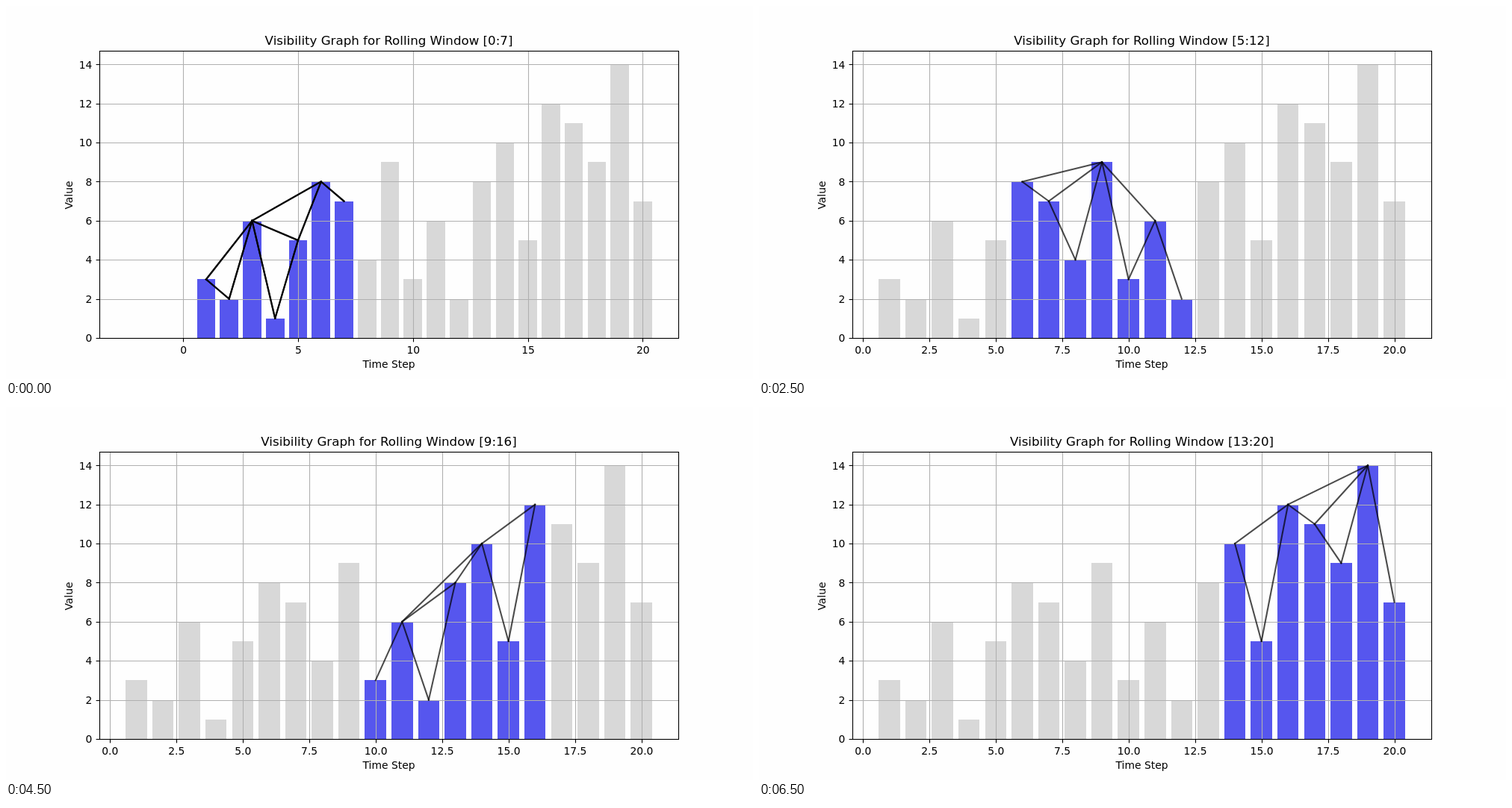
These frames come from a looping animation (1000 px wide and 500 px high, 7000 ms). An HTML page with a canvas:

```html
<!DOCTYPE html>
<html lang="en">
<head>
<meta charset="utf-8">
<title>Visibility Graph</title>
<style>
  html, body { margin: 0; overflow: hidden; background: #fefefe; }
  canvas { display: block; }
</style>
</head>
<body>
<canvas id="chart" width="1000" height="500"></canvas>
<script>
const ctx = document.getElementById('chart').getContext('2d');
const values = [3, 2, 6, 1, 5, 8, 7, 4, 9, 3, 6, 2, 8, 10, 5, 12, 11, 9, 14, 7];
const WINDOW = 7, STEP_MS = 500;
const STEPS = values.length - WINDOW + 1;
const LEFT = 125, RIGHT = 900, TOP = 60, BOTTOM = 445;
const MIDDLE = (LEFT + RIGHT) / 2;

const toY = v => BOTTOM - v * (BOTTOM - TOP) / 14.7;
const crisp = p => Math.round(p) + 0.5;

function line(x1, y1, x2, y2) {
  ctx.beginPath();
  ctx.moveTo(x1, y1);
  ctx.lineTo(x2, y2);
  ctx.stroke();
}

function text(label, x, y, align = 'center', size = 13.889) {
  ctx.font = `${size}px "DejaVu Sans", sans-serif`;
  ctx.textAlign = align;
  ctx.fillText(label, x, y);
}

// Two bars see each other when every bar between stays below the sight line.
function visible(a, b) {
  for (let i = a + 1; i < b; i++) {
    const sight = values[a] + (values[b] - values[a]) * (i - a) / (b - a);
    if (values[i] >= sight) return false;
  }
  return true;
}

function draw(start) {
  const first = start === 0;
  const [min, max] = first ? [-3.645, 21.545] : [-0.39, 21.39];
  const toX = v => LEFT + (v - min) * (RIGHT - LEFT) / (max - min);
  const end = start + WINDOW;

  ctx.fillStyle = '#fefefe';
  ctx.fillRect(0, 0, 1000, 500);

  values.forEach((v, i) => {
    const x = Math.round(toX(i + 0.6)), y = Math.round(toY(v));
    ctx.fillStyle = i >= start && i < end ? '#5656ee' : '#d8d8d8';
    ctx.fillRect(x, y, Math.round(toX(i + 1.4)) - x, BOTTOM - y);
  });

  const xTicks = [], yTicks = [];
  for (let v = 0; v <= 20; v += first ? 5 : 2.5) xTicks.push(v);
  for (let v = 0; v <= 14; v += 2) yTicks.push(v);

  ctx.lineWidth = 1.11;
  ctx.lineCap = 'butt';
  ctx.strokeStyle = '#b0b0b0';
  for (const v of xTicks) line(crisp(toX(v)), TOP, crisp(toX(v)), BOTTOM);
  for (const v of yTicks) line(LEFT, crisp(toY(v)), RIGHT, crisp(toY(v)));

  // The opening window is stroked repeatedly, which makes its edges solid.
  ctx.strokeStyle = 'rgba(0, 0, 0, 0.7)';
  ctx.lineWidth = 2.083;
  ctx.lineCap = 'square';
  for (let pass = first ? 3 : 1; pass > 0; pass--)
    for (let a = start; a < end; a++)
      for (let b = a + 1; b < end; b++)
        if (visible(a, b)) line(toX(a + 1), toY(values[a]), toX(b + 1), toY(values[b]));

  ctx.strokeStyle = ctx.fillStyle = '#000';
  ctx.lineWidth = 1.11;
  ctx.lineCap = 'butt';
  ctx.strokeRect(LEFT + 0.5, TOP + 0.5, RIGHT - LEFT, BOTTOM - TOP);
  for (const v of xTicks) {
    line(crisp(toX(v)), BOTTOM + 0.5, crisp(toX(v)), BOTTOM + 5.4);
    text(first ? v : v.toFixed(1), toX(v) + 0.4, 466);
  }
  for (const v of yTicks) {
    line(LEFT - 4.4, crisp(toY(v)), LEFT + 0.5, crisp(toY(v)));
    text(v, 115.3, Math.round(toY(v) + 5.2), 'right');
  }

  text(`Visibility Graph for Rolling Window [${start}:${end}]`, MIDDLE, 52, 'center', 16.667);
  text('Time Step', MIDDLE, 485);
  ctx.save();
  ctx.translate(89, (TOP + BOTTOM) / 2 + 1);
  ctx.rotate(-Math.PI / 2);
  text('Value', 0, 0);
  ctx.restore();
}

function tick() {
  draw(Math.floor(performance.now() / STEP_MS) % STEPS);
  requestAnimationFrame(tick);
}
tick();
</script>
</body>
</html>
```
